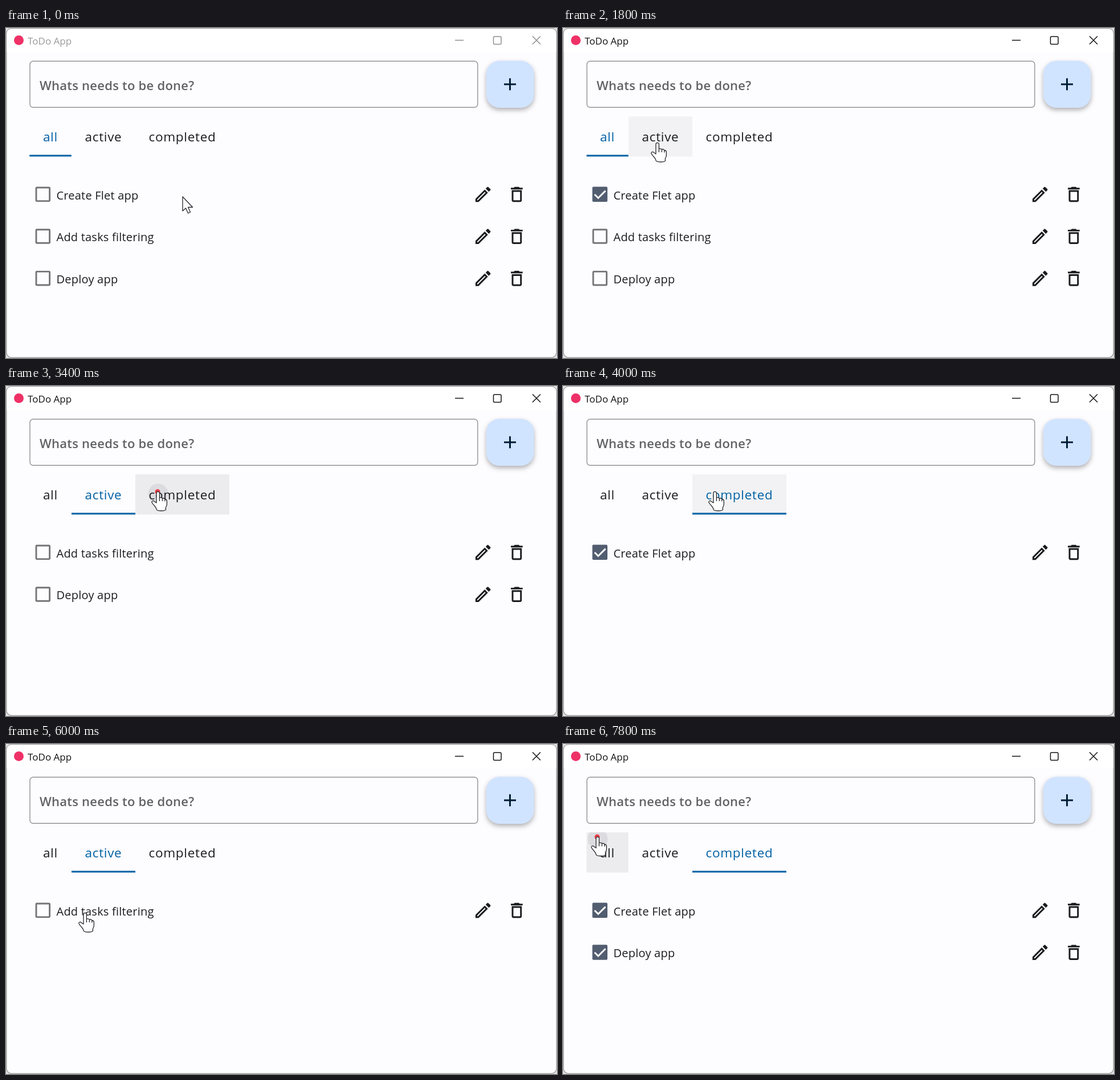
Recreate the animation shown at these times as an HTML page. Size 967 px wide and 579 px high, loop 8 s.

```html
<!DOCTYPE html>
<html lang="en">
<head>
<meta charset="utf-8">
<title>ToDo App</title>
<style>
  html, body { margin: 0; width: 100%; height: 100%; overflow: hidden; background: #e4e4e4; }
  svg { display: block; }
  text { font-family: "Open Sans", "Noto Sans", sans-serif; fill: #1a1c1e; white-space: pre; }
  .title { font-size: 17px; }
  .hint { font-size: 22px; font-weight: 600; letter-spacing: .25px; fill: #616265; }
  .tab { font-size: 22.5px; letter-spacing: .68px; }
  .task { font-size: 20px; letter-spacing: .22px; }
  .fab { filter: drop-shadow(0 4px 4px rgba(0, 0, 0, .3)); }
  .cursor { fill: #fff; stroke: #25262b; stroke-width: 1.3; stroke-linejoin: round; }
</style>
</head>
<body>
<svg width="967" height="579" viewBox="0 0 967 579">
  <defs>
    <clipPath id="tabArea"><rect x="41" y="155" width="351" height="70.500"/></clipPath>
    <path id="edit" d="M14.06 9.02l.92.92L5.92 19H5v-.92l9.06-9.06M17.66 3c-.25 0-.51.1-.7.29l-1.83 1.83 3.75 3.75 1.83-1.83c.39-.39.39-1.02 0-1.41l-2.34-2.34c-.2-.2-.45-.29-.71-.29zm-3.6 3.19L3 17.25V21h3.75L17.81 9.94l-3.75-3.75z"/>
    <path id="bin" d="M6 19c0 1.1.9 2 2 2h8c1.1 0 2-.9 2-2V7H6v12zM8 9h8v10H8V9zm7.5-5l-1-1h-5l-1 1H5v2h14V4z"/>
    <path id="arrow" d="M0 0V25l5.500-5 4 9 4-2-4-8.500h8z"/>
    <path id="hand" d="M-3 3a2.7 2.7 0 0 1 5.4 0V11q3-1 5 1q3-1 4.500 1.500q3.500 0 3.500 4V22q0 3-2 6v4q-1 2-8 2t-8-2q-1-4-4-7q-3-3-4.500-6q0-3 3-2.500l5.100 3.500zM2.400 11v6M7.400 12v5M11.900 13.500v4"/>
  </defs>
  <rect x=".75" y=".75" width="965.5" height="577.5" rx="9" fill="#fdfcff" stroke="#a3a3a3" stroke-width="1.5"/>
  <path d="M1.500 43V10q0-8.500 8.500-8.500H957q8.500 0 8.500 8.500V43z" fill="#fff"/>
  <circle cx="22.500" cy="21.500" r="8.500" fill="#ee3167"/>
  <text id="title" class="title" x="38" y="28.500">ToDo App</text>
  <path id="buttons" d="M788 21.500h15M857.500 15h9.500q2 0 2 2v9.500q0 2-2 2h-9.500q-2 0-2-2V17q0-2 2-2zM924 14.500l14 14M938 14.500l-14 14" fill="none" stroke-width="1.5"/>
  <rect x="42" y="58.300" width="785.800" height="81" rx="5.500" fill="none" stroke="#929397" stroke-width="1.4"/>
  <text class="hint" x="59" y="108.500">Whats needs to be done?</text>
  <rect class="fab" x="843" y="57.500" width="83.500" height="82.500" rx="23" fill="#d1e4ff"/>
  <path d="M874 98.800h21M884.500 88.300v21" stroke="#001d36" stroke-width="3"/>
  <g id="scene"></g>
</svg>
<script>
const LOOP = 8000, STEP = 200, ROW = 73.7;
const el = id => document.getElementById(id);
const tabs = [
  { name: 'all', x: 41.3, w: 73.5 },
  { name: 'active', x: 115, w: 112 },
  { name: 'completed', x: 227, w: 165 }
];
const tasks = [
  { name: 'Create Flet app', doneAt: 1400 },
  { name: 'Add tasks filtering', doneAt: Infinity },
  { name: 'Deploy app', doneAt: 5800 }
];
const presses = [1200, 2400, 3400, 4400, 5600, 6600, 7800];
const selections = [[0, 0], [2600, 1], [3600, 2], [4600, 1], [6800, 2]]; // time, tab
const route = [ // time, x, y of the pointer tip
  [0, 310, 296], [200, 190, 328], [400, 93, 289], [1400, 93, 289], [1600, 130, 250],
  [1800, 166, 201], [2000, 167, 198.5], [2600, 167, 198.5], [3000, 215, 194],
  [3400, 267, 185], [4000, 267, 185], [4400, 165, 195], [4600, 165, 195],
  [4800, 150, 196], [5000, 107, 196], [5200, 95, 262], [5400, 100, 345],
  [5600, 105, 365], [5800, 120, 348], [6000, 139, 296], [6200, 215, 232],
  [6400, 262, 188], [6600, 262, 188], [6800, 220, 232], [7000, 145, 289],
  [7400, 85, 205], [7600, 62, 165], [7800, 61, 162.5]
];

function pointer(t) {
  const i = route.findIndex(k => k[0] >= t);
  const b = route[i];
  if (b[0] === t) return [b[1], b[2]];
  const a = route[i - 1], f = (t - a[0]) / (b[0] - a[0]);
  return [a[1] + (b[1] - a[1]) * f, a[2] + (b[2] - a[2]) * f];
}

const tabAt = (x, y) =>
  y >= 155 && y <= 225 ? tabs.find(tab => x >= tab.x && x < tab.x + tab.w) : undefined;
const circle = (x, y, r, fill, alpha = 1) =>
  `<circle cx="${x}" cy="${y}" r="${r}" fill="${fill}" opacity="${alpha}"/>`;

function drawTab(tab, selected) {
  const line = selected
    ? `<rect x="${tab.x}" y="222.500" width="${tab.w}" height="3" fill="#0061a4"/>` : '';
  const color = selected ? '#0061a4' : '#1a1c1e';
  return `${line}<text class="tab" x="${tab.x + 23.6}" y="199" style="fill:${color}">${tab.name}</text>`;
}

function drawTask(task, i, done) {
  const box = done
    ? `<rect x="51.500" y="-13.500" width="26.500" height="26.500" rx="2" fill="#525d70"/>
       <path d="M55.500 0l6.300 6.300L74.500-6.400" fill="none" stroke="#fff" stroke-width="2.900"/>`
    : '<rect x="53" y="-12" width="23.600" height="23.600" rx="1" fill="none" stroke="#747579" stroke-width="2.900"/>';
  const icon = (id, x) =>
    `<use href="#${id}" transform="translate(${x} -17.700) scale(1.4735)" fill="#1a1c1e"/>`;
  return `<g transform="translate(0 ${292 + i * ROW})">${box}
    <text class="task" x="88.500" y="8.500">${task.name}</text>
    ${icon('edit', 819.5)}${icon('bin', 878.7)}</g>`;
}

function draw(t) {
  const [x, y] = pointer(t);
  const selected = selections.filter(s => s[0] <= t).pop()[1];
  const done = task => t >= task.doneAt;
  const shown = tasks.filter(task => !selected || done(task) === (selected === 2));
  const hover = tabAt(x, y);
  const onTask = x > 48 && x < 270 && shown.some((_, i) => Math.abs(y - 292 - i * ROW) < 25);
  const press = presses.find(p => t === p || t === p + STEP);
  let out = '', mark = '';

  if (hover) {
    const shade = press === undefined ? '#f2f2f4' : press === t ? '#ececee' : '#e7e7e9';
    out += `<rect x="${hover.x}" y="155" width="${hover.w}" height="70.500" fill="${shade}"/>`;
  }
  if (press !== undefined) {
    const [px, py] = pointer(press);
    if (press === t) {
      if (hover) out += `<g clip-path="url(#tabArea)">${circle(px, py + 4, 17.5, '#dcdce0')}</g>`;
      mark = circle(px - 1, py + .5, 4.5, '#ee2b36', .9);
    } else {
      mark = circle(px - 1, py, 17.5, '#ff5040', .13);
    }
  }
  out += tabs.map((tab, i) => drawTab(tab, i === selected)).join('');
  out += shown.map((task, i) => drawTask(task, i, done(task))).join('');
  out += mark;
  out += `<use class="cursor" href="#${hover || onTask ? 'hand' : 'arrow'}" x="${x}" y="${y}"/>`;
  el('scene').innerHTML = out;

  const focused = t >= 1200;
  el('title').style.fill = focused ? '#111' : '#999';
  el('buttons').setAttribute('stroke', focused ? '#111' : '#8d8d8d');
}

const start = performance.now();
let last = -1;
function tick() {
  const t = Math.floor((performance.now() - start) % LOOP / STEP) * STEP;
  if (t !== last) draw(last = t);
  requestAnimationFrame(tick);
}
tick();
</script>
</body>
</html>
```
